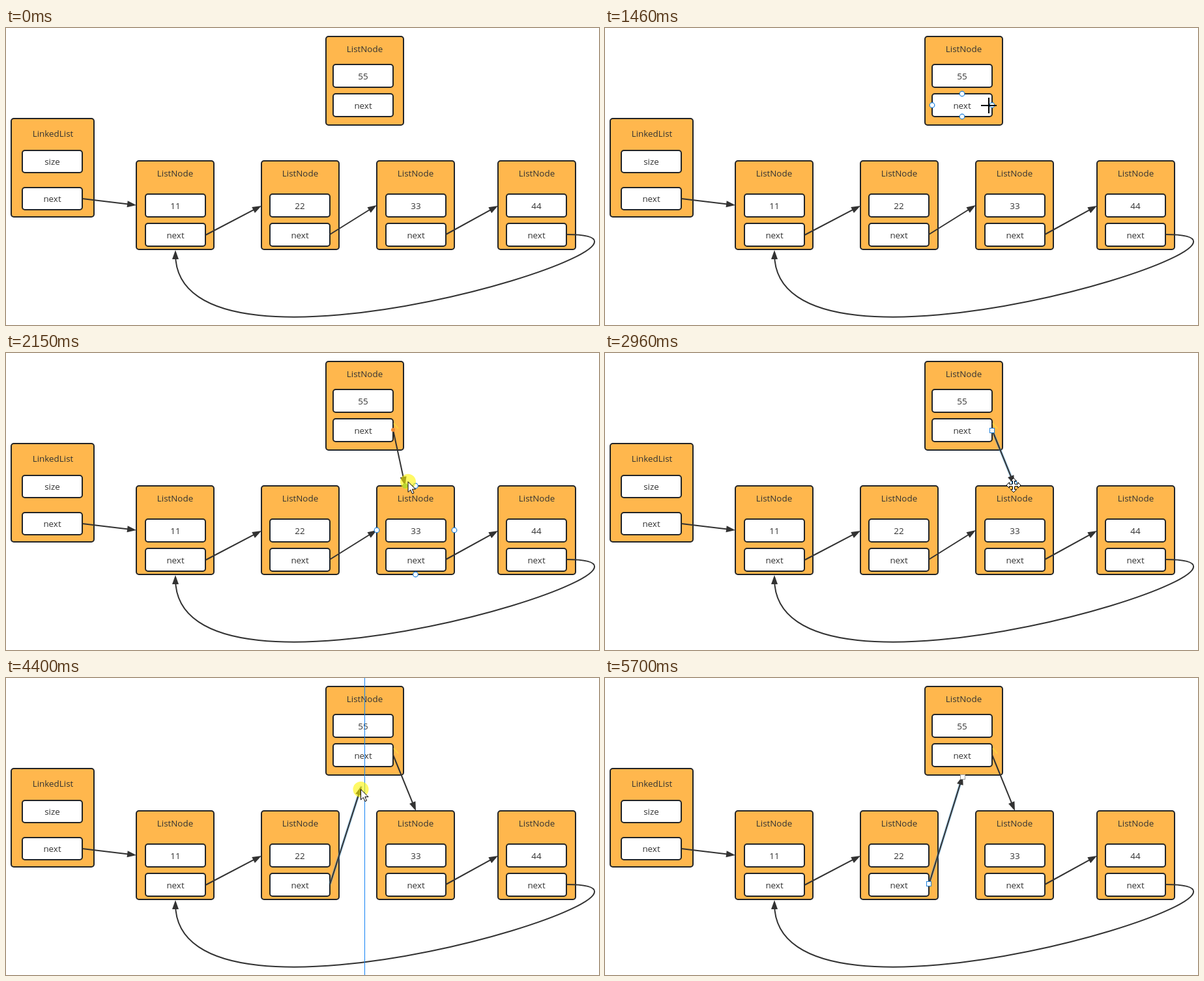
Write an HTML page with a canvas that moves like this. It is 910 px wide and 456 px high and loops after 6100 ms.

```html
<!DOCTYPE html>
<html lang="en">
<head>
<meta charset="utf-8">
<title>Linked list insertion</title>
<style>
  html, body { margin: 0; width: 100%; height: 100%; overflow: hidden; background: #fff; }
  canvas { display: block; }
</style>
</head>
<body>
<canvas id="stage" width="910" height="456"></canvas>
<script>
const ctx = document.getElementById('stage').getContext('2d');
const LOOP = 6100, INK = '#323232', BORDER = '#222426', BLUE = '#1a7fdc';

// Each move: [start, end, number of steps, Bezier control points]
const cursorMoves = [
  [70, 640, 9, [[826, 404], [690, 380], [750, 190], [616, 133]]],
  [710, 990, 5, [[612, 131], [590, 117]]],
  [1190, 1260, 2, [[590, 116], [589, 118]]],
  [1460, 1530, 2, [[589, 119], [590, 119]]],
  [1730, 2290, 9, [[590, 120], [622, 212]]],
  [2490, 2630, 3, [[622, 208], [627, 203]]],
  [2960, 3510, 9, [[627, 203], [620, 260], [560, 282]]],
  [3910, 4470, 9, [[560, 282], [505, 235], [548, 165]]],
  [4550, 4750, 4, [[548, 163], [548, 154]]],
  [5010, 5570, 9, [[548, 158], [520, 330], [640, 420], [837, 453]]]
];
const newLinkMoves = [
  [1730, 2290, 9, [[594, 118], [616, 220]]],
  [2490, 2630, 3, [[619, 204], [629, 204]]],
  [2960, 2960, 1, [[628, 202]]],
  [3980, 3980, 1, [[629, 204]]]
];
const movedLinkMoves = [
  [0, 0, 1, [[569, 272]]],
  [3910, 4470, 9, [[572, 272], [515, 230], [548, 160]]],
  [4550, 4750, 4, [[548, 157], [549, 150]]]
];

const during = (t, from, to) => t >= from && t < to;

function bezier(points, p) {
  while (points.length > 1) {
    points = points.slice(1).map((b, i) => points[i].map((a, k) => a + (b[k] - a) * p));
  }
  return points[0];
}

function positionAt(moves, t) {
  const [start, end, steps, points] = moves.filter(m => m[0] <= t).pop() || moves[0];
  if (steps === 1) return points[0];
  const step = Math.floor((t - start) * (steps - 1) / (end - start) + 1e-6);
  const p = Math.max(0, Math.min(1, step / (steps - 1)));
  return bezier(points, p * p * (3 - 2 * p));
}

function box(x, y, w, h, fill) {
  ctx.beginPath();
  ctx.roundRect(x, y, w, h, 4);
  ctx.fillStyle = fill;
  ctx.fill();
  ctx.strokeStyle = BORDER;
  ctx.lineWidth = 2;
  ctx.stroke();
}

function label(text, x, y) {
  ctx.fillStyle = INK;
  ctx.fillText(text, x, y + 5);
}

function field(text, x, y, h = 35) {
  box(x, y, 92, h, '#fff');
  label(text, x + 46, y + h / 2);
}

function node(value, x, y, dx, dy) {
  box(x, y, 119, 136, '#ffb74d');
  label('ListNode', x + 59.5, y + 19);
  field(value, x + dx, y + dy);
  field('next', x + dx, y + dy + 45);
}

function arrowHead(x, y, angle) {
  ctx.save();
  ctx.translate(x, y);
  ctx.rotate(angle);
  ctx.beginPath();
  ctx.moveTo(0, 0);
  ctx.lineTo(-14, -5);
  ctx.lineTo(-14, 5);
  ctx.fillStyle = INK;
  ctx.fill();
  ctx.restore();
}

function line(x1, y1, x2, y2, color, width) {
  ctx.beginPath();
  ctx.moveTo(x1, y1);
  ctx.lineTo(x2, y2);
  ctx.strokeStyle = color;
  ctx.lineWidth = width;
  ctx.stroke();
}

function arrow(x1, y1, x2, y2, selected) {
  if (selected) line(x1, y1, x2, y2, 'rgba(70,165,235,.45)', 4);
  const angle = Math.atan2(y2 - y1, x2 - x1);
  const length = Math.hypot(x2 - x1, y2 - y1);
  const inset = Math.min(8, length);
  line(x1, y1, x2 - inset * Math.cos(angle), y2 - inset * Math.sin(angle), INK, 2);
  if (length > 14) arrowHead(x2, y2, angle);
}

function dot(x, y, r, fill, stroke) {
  ctx.beginPath();
  ctx.arc(x, y, r, 0, 7);
  ctx.fillStyle = fill;
  ctx.fill();
  if (!stroke) return;
  ctx.strokeStyle = stroke;
  ctx.lineWidth = 1.2;
  ctx.stroke();
}

function handles(x, y, w, h) {
  const cx = x + w / 2, cy = y + h / 2;
  for (const [hx, hy] of [[cx, y], [x + w, cy], [cx, y + h], [x, cy]]) dot(hx, hy, 3.8, '#fff', BLUE);
}

function grip(x, y, color = BLUE) {
  ctx.fillStyle = '#fff';
  ctx.fillRect(x - 3.5, y - 3.5, 7, 7);
  ctx.strokeStyle = color;
  ctx.lineWidth = 1;
  ctx.strokeRect(x - 3.5, y - 3.5, 7, 7);
}

const guideX = x => line(x + .5, 0, x + .5, 456, '#1684f5', 1);
const guideY = y => line(0, y + .5, 910, y + .5, '#1684f5', 1);

function polygon(points, fill) {
  ctx.beginPath();
  points.forEach(([x, y]) => ctx.lineTo(x, y));
  ctx.closePath();
  ctx.fillStyle = fill;
  ctx.fill();
  ctx.strokeStyle = '#000';
  ctx.lineWidth = 1;
  ctx.stroke();
}

function drawPointer(kind, pressed) {
  if (kind === 'cross') {
    line(-12, 0, 12, 0, '#000', 2);
    line(0, -12, 0, 12, '#000', 2);
  } else if (kind === 'move') {
    const arm = [[-1.5, -2], [-1.5, -6.5], [-4.5, -6.5], [0, -11], [4.5, -6.5], [1.5, -6.5], [1.5, -2]];
    const points = [];
    for (let i = 0; i < 4; i++) {
      const c = [1, 0, -1, 0][i], s = [0, 1, 0, -1][i];
      arm.forEach(([x, y]) => points.push([x * c - y * s, x * s + y * c]));
    }
    polygon(points, pressed ? 'transparent' : '#fff');
  } else {
    polygon([[0, 0], [0, 16], [3.8, 12.5], [6.5, 18.5], [9, 17.3], [6.4, 11.5], [11.5, 11.5]], '#fff');
  }
}

function drawCursor(t) {
  if (!during(t, 70, 5700)) return;
  const [x, y] = positionAt(cursorMoves, t);
  const pressed = during(t, 1530, 2960) || during(t, 3580, 5010);
  const kind = during(t, 920, 1730) ? 'cross' : during(t, 2960, 3980) ? 'move' : 'arrow';
  if (pressed) dot(x, y, 12, 'rgba(255,245,0,.6)');
  ctx.save();
  ctx.translate(x, y);
  drawPointer(kind, pressed);
  ctx.restore();
}

function drawDiagram() {
  box(8, 139, 127, 151, '#ffb74d');
  label('LinkedList', 72, 162);
  field('size', 25, 188, 34);
  field('next', 25, 245, 34);
  node('11', 200, 204, 14, 51);
  node('22', 392, 204, 13, 51);
  node('33', 569, 204, 14, 51);
  node('44', 755, 204, 13, 51);
  node('55', 491, 13, 11, 43);

  arrow(117, 262, 200, 272);
  arrow(306, 318, 392, 273);
  arrow(675, 317, 755, 273);
  ctx.beginPath();
  ctx.moveTo(860, 317);
  ctx.bezierCurveTo(1100, 317, 260, 581, 260, 347);
  ctx.strokeStyle = INK;
  ctx.lineWidth = 2;
  ctx.stroke();
  arrowHead(260, 341, -Math.PI / 2);
}

function draw(t) {
  ctx.fillStyle = '#fff';
  ctx.fillRect(0, 0, 910, 456);
  drawDiagram();

  const newSelected = during(t, 2960, 3980), movedSelected = t >= 3980;
  arrow(497, 317, ...positionAt(movedLinkMoves, t), movedSelected);
  if (t >= 1730) {
    line(595, 108, 602, 116, 'rgba(255,220,60,.7)', 2);
    const [x, y] = positionAt(newLinkMoves, t);
    arrow(594, 118, x, Math.min(y, 204), newSelected);
  }

  if (during(t, 710, 920) || during(t, 4550, 5010)) handles(491, 13, 119, 136);
  if (during(t, 850, 1730) || during(t, 4550, 5010)) handles(502, 101, 92, 35);
  if (during(t, 2080, 2290) || during(t, 2490, 2960) || during(t, 3030, 3440)) handles(569, 204, 119, 136);

  if (during(t, 1730, 2960)) dot(594, 118, 3, '#f08a35');
  if (during(t, 2080, 2960)) dot(positionAt(newLinkMoves, t)[0], 204, 4, '#55a878');
  if (during(t, 4750, 5010)) dot(550, 149, 4, '#7894a8');

  if (newSelected) {
    grip(594, 119);
    grip(628, 201);
  }
  if (t >= 5010) {
    grip(497, 316);
    grip(549, 152, '#999');
  }

  if (during(t, 1870, 1940)) guideY(142);
  if (during(t, 2010, 2080)) guideX(610);
  if (during(t, 2560, 2960)) guideX(628);
  if (during(t, 4190, 4260)) guideY(204);
  if (during(t, 4400, 4470)) guideX(550);
  if (during(t, 4620, 5010)) guideY(142);

  drawCursor(t);
}

function frame() {
  ctx.font = '13.4px "Open Sans", "Noto Sans", sans-serif';
  ctx.textAlign = 'center';
  draw(performance.now() % LOOP);
  requestAnimationFrame(frame);
}
frame();
</script>
</body>
</html>
```
